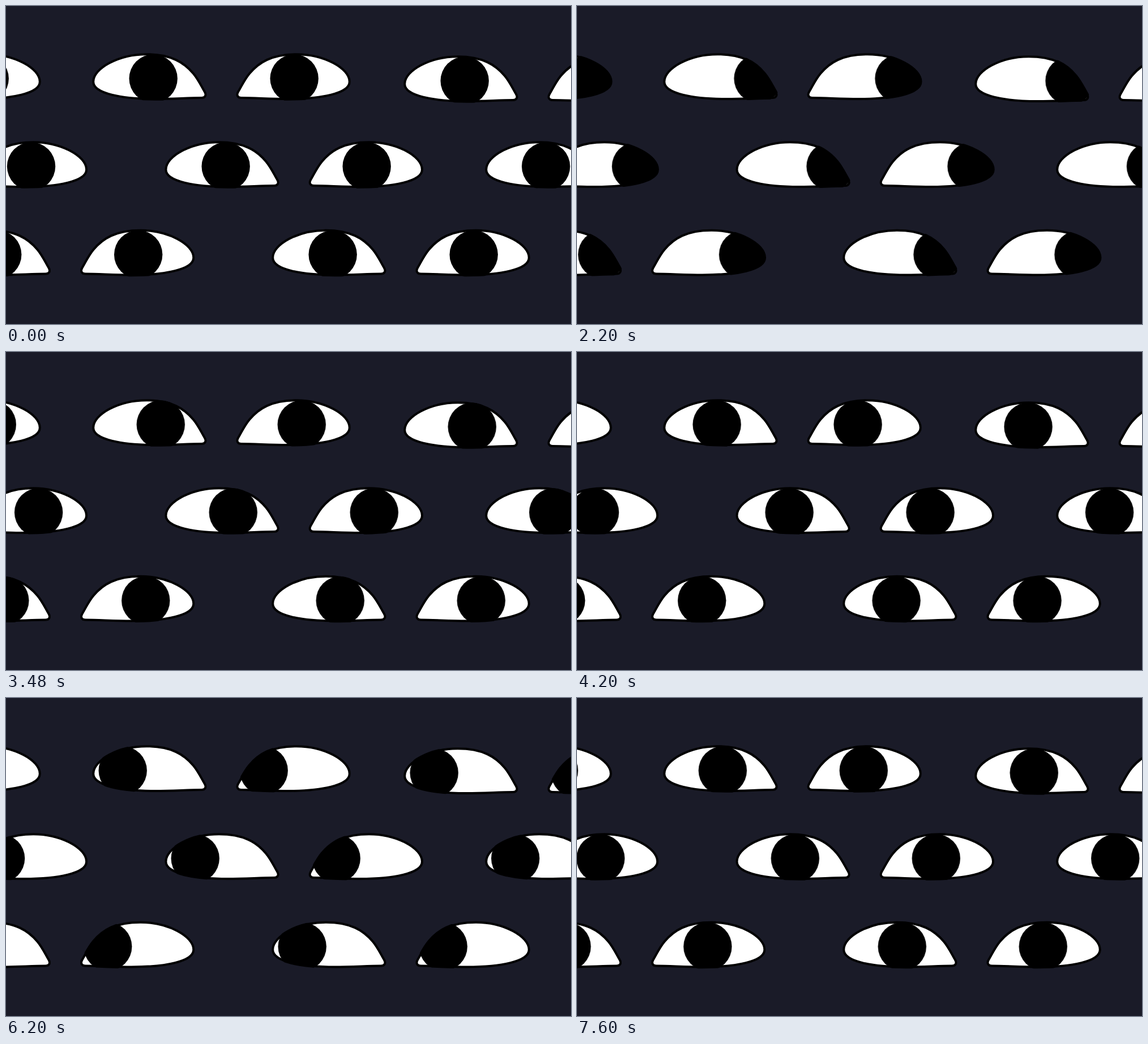
Write an HTML page without scripts that moves like this. It is 998 by 561 pixels and loops after 7640 ms.

```html
<!DOCTYPE html>
<html lang="en">
<head>
<meta charset="utf-8">
<title>Watching eyes</title>
<style>
  html, body { margin: 0; width: 100%; height: 100%; overflow: hidden; background: #1a1b28; }
  svg { display: block; width: 100%; height: 100%; }
  .lids { fill: #fff; stroke: #000; stroke-width: 4; }
  .area { fill: #fff; stroke: #fff; stroke-width: 5.4; }

  /* Steady sweep right, left and back, at 25 steps a second */
  .gaze { animation: look 7640ms -5ms infinite; }
  @keyframes look {
    0% { transform: translateX(0); animation-timing-function: steps(48); }
    25.1309% { transform: translateX(70px); animation-timing-function: steps(96); }
    75.3927% { transform: translateX(-70px); animation-timing-function: steps(47); }
    100% { transform: translateX(-1.458px); }
  }
</style>
</head>
<body>
<svg viewBox="0 0 998 561" preserveAspectRatio="none">
  <defs>
    <path id="lid" d="M154.2 133.5C154.2 110 199 85.2 248 85.2C292 85.2 314.5 99.5 331 119.2
      C340 130 345 141.5 351 151.5C354.3 157.3 351.8 162 345.5 162.1
      C320 162.2 295 164 264 164C205 164 154.2 154.5 154.2 133.5Z"/>
    <g id="lids">
      <use href="#lid"/>
      <use href="#lid" transform="translate(761) scale(-1 1)"/>
    </g>
    <g id="pupils">
      <circle cx="260.2" cy="128" r="42.7"/>
      <circle cx="509.2" cy="128" r="42.7"/>
    </g>
    <g id="faces">
      <use href="#lids" x="-547"/>
      <use href="#lids"/>
      <use href="#lids" x="550" y="4"/>
      <use href="#lids" x="-464.7" y="155"/>
      <use href="#lids" x="128.2" y="155"/>
      <use href="#lids" x="694" y="155"/>
      <use href="#lids" x="-275.5" y="310.5"/>
      <use href="#lids" x="317" y="310.5"/>
    </g>
    <mask id="inside" maskUnits="userSpaceOnUse" x="0" y="0" width="998" height="561">
      <use href="#faces" class="area"/>
    </mask>
  </defs>

  <use href="#faces" class="lids"/>
  <g mask="url(#inside)">
    <g class="gaze">
      <use href="#pupils" x="-547"/>
      <use href="#pupils"/>
      <use href="#pupils" x="550" y="4"/>
      <use href="#pupils" x="-464.7" y="155"/>
      <use href="#pupils" x="128" y="155"/>
      <use href="#pupils" x="693.5" y="155"/>
      <use href="#pupils" x="-275.5" y="310.5"/>
      <use href="#pupils" x="317" y="310.5"/>
    </g>
  </g>
</svg>
</body>
</html>
```
